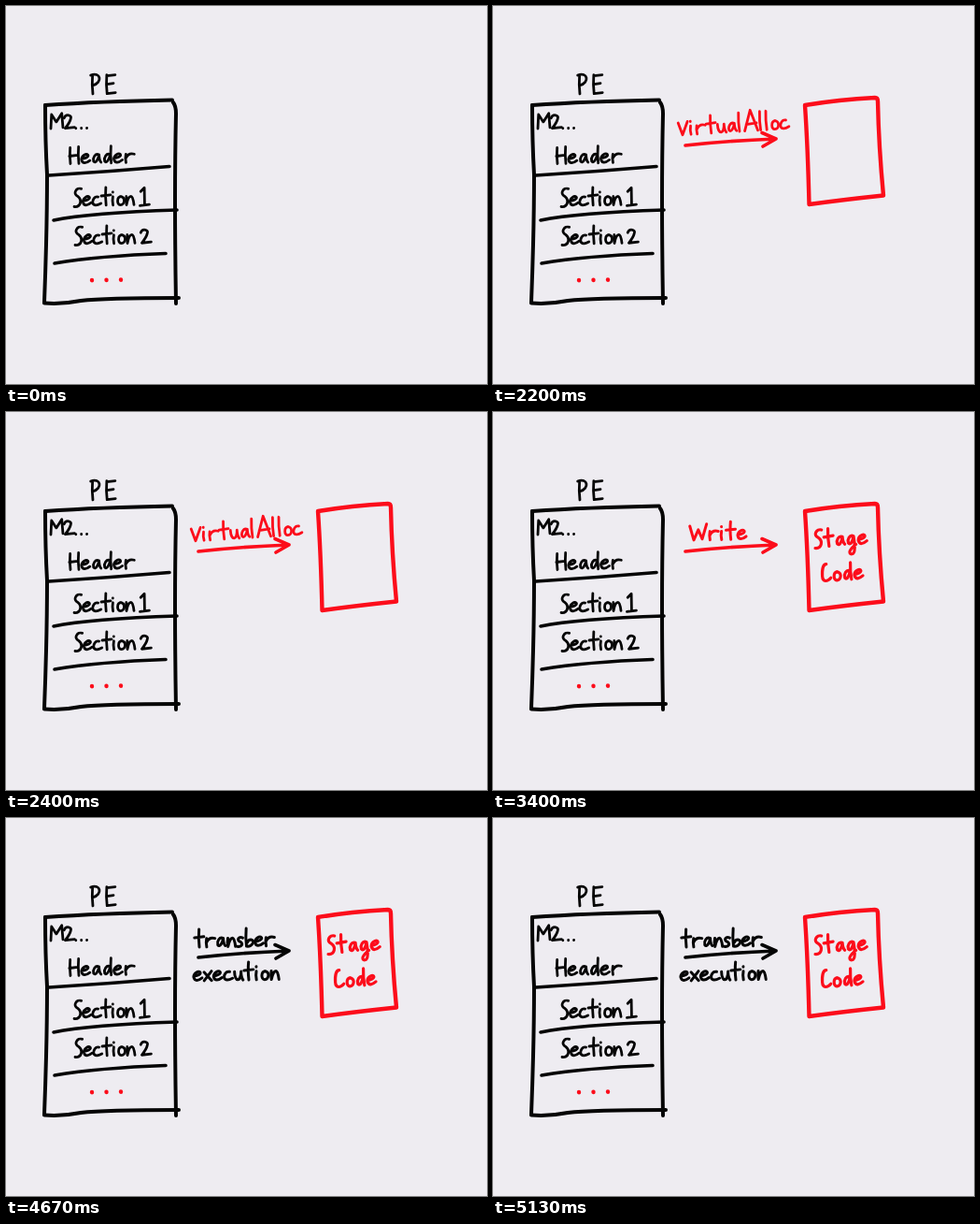
These frames come from a looping animation (515 by 404 pixels, 6.07 s). An HTML page:

```html
<!DOCTYPE html>
<html lang="en">
<head>
<meta charset="utf-8">
<title>PE staging</title>
<style>
  html, body { margin: 0; width: 100%; height: 100%; overflow: hidden; background: #eeecf1; }
  svg { display: block; width: 100vw; height: 100vh; }
  path { fill: none; stroke-linecap: round; stroke-linejoin: round; }
</style>
</head>
<body>
<svg viewBox="0 0 515 404"></svg>
<script>
const BLACK = '#050505', RED = '#fc0d1b', LOOP = 6070;
const svg = document.querySelector('svg');

// Pen strokes shared by the handwritten letters; the baseline is y = 0.
const stem = (x, height) => `M${x} ${-height}q-1 ${height / 2} 0 ${height}`;
const bar = (x, height, width) => `M${x} ${-height}l${width}-1`;
const dot = (x, height) => `M${x} ${-height}v.3`;
const bowl = 'M7-9C3-11 0-6 1-2C3 1 6-4 7-9';
const two = 'M0-11C2-16 9-14 7-10Q6-6 1 0L11-1';

const glyphs = {
  a: bowl + 'Q7-3 9-1',
  c: 'M6-9C2-10 0-6 0-3C1 1 5 0 9-2',
  d: bowl + stem(8, 18),
  e: 'M0-5C4-5 8-7 7-9C5-11 0-8 0-4C1 1 5 0 9-3',
  f: stem(2, 19) + 'C8 1 12-6 7-7Q4-7 3-4',
  g: bowl + 'C8 0 8 10 4 10C0 10 1 5 9 0',
  i: stem(1, 9) + dot(1, 14),
  l: stem(1, 20),
  n: stem(1, 9) + 'C2-5 4-9 6-9Q8-9 9 0',
  o: 'M4-9C-1-9-1 0 3 0C8 0 9-9 3-9',
  r: stem(1, 9) + 'M1-5Q4-11 10-9',
  s: 'M6-9C2-11-1-7 3-5C7-3 5 1 0 0',
  t: stem(4, 19) + bar(-1, 10, 10),
  u: 'M0-9C0 3 7 2 7-9Q7-3 9 0',
  x: 'M0-9L8 0' + 'M8-10L0 0',
  z: two,
  A: 'M0 0L7-22L14 0' + bar(2, 7, 11),
  C: 'M6-18C2-18 1-10 1-5C1 1 6 1 10-3',
  E: stem(2, 20) + bar(2, 19, 9) + bar(2, 10, 7) + bar(2, 0, 9),
  H: stem(1, 17) + bar(0, 8, 9) + stem(10, 18),
  M: 'M0 0L1-15L6-7L12-16L13-1',
  P: stem(2, 20) + 'M0-20C11-24 13-12 2-9',
  S: 'M8-18C3-20-2-13 4-10C9-6 7 2 0 1',
  V: 'M0-13L4 0L10-14',
  W: 'M0-15L4 0L9-11L13-1L18-17',
  1: 'M1-14L5-18V0' + bar(0, -1, 10),
  2: two,
  '.': dot(0, 0)
};

function add(parent, tag, attrs = {}) {
  const node = document.createElementNS('http://www.w3.org/2000/svg', tag);
  for (const key in attrs) node.setAttribute(key, attrs[key]);
  return parent.appendChild(node);
}

const line = (parent, d, color, width = 4) =>
  add(parent, 'path', { d, stroke: color, 'stroke-width': width });

// Each letter advances the pen by its own drawn width plus a gap.
function write(parent, text, x, y, color, { tracking = 0, tilt = -1, weight = 2.8 } = {}) {
  const word = add(parent, 'g', {
    role: 'img', 'aria-label': text, transform: `translate(${x} ${y}) rotate(${tilt})`
  });
  let pen = 0;
  for (const char of text) {
    if (char === ' ') { pen += 5; continue; }
    const letter = line(word, glyphs[char], color, weight);
    const box = letter.getBBox();
    letter.setAttribute('transform', `translate(${pen} 0)`);
    pen += Math.max(box.x + box.width, 4.5) + 1.4 + tracking;
  }
}

const arrow = (parent, color) =>
  line(parent, 'M206 149Q250 144 303 142M288 135.5L303 142L289 150', color, 3.6);

function drawFile(g) {
  line(g, 'M42 106Q100 102 178 100.5', BLACK);
  line(g, 'M42 106Q42 145 44 180Q44 240 41 317', BLACK);
  line(g, 'M179 103Q182 107 182 115Q180 200 182 318', BLACK);
  line(g, 'M41 317.5Q60 319 80 315Q105 312 185 312', BLACK);
  line(g, 'M46 181Q110 177 175 171.5', BLACK, 3.6);
  line(g, 'M51 229Q90 221 183 218', BLACK, 3.6);
  line(g, 'M52 275Q100 267 171 264.5', BLACK, 3.6);
  write(g, 'PE', 91, 94, BLACK, { tracking: 4.5 });
  write(g, 'Mz...', 48, 131, BLACK);
  write(g, 'Header', 68, 168.5, BLACK, { tracking: 1.5 });
  write(g, 'Section 1', 73, 213.5, BLACK);
  write(g, 'Section 2', 74, 254.5, BLACK);
  write(g, '...', 92, 293, RED, { tracking: 9.6, weight: 4.4 });
}

function drawMemory(g) {
  line(g, 'M334 106Q370 100 409 98Q412 98 412 102Q413 150 418 202.5Q375 207 338.5 212Q337 150 334 106', RED, 4.4);
}

function drawAlloc(g) {
  write(g, 'VirtualAlloc', 199, 138, RED, { tracking: 0.7, tilt: -3.5 });
  arrow(g, RED);
}

function drawWrite(g) {
  write(g, 'Write', 211, 137, RED, { tracking: 1, weight: 3 });
  arrow(g, RED);
}

function drawStage(g) {
  write(g, 'Stage', 345, 144.5, RED, { tracking: 1.5, tilt: -4, weight: 3.2 });
  write(g, 'Code', 352, 181, RED, { tracking: 2, tilt: -4, weight: 3.2 });
}

function drawTransfer(g) {
  write(g, 'transfer', 203, 138, BLACK, { tracking: 0.5, weight: 3 });
  write(g, 'execution', 201, 174, BLACK, { tracking: 0.8, weight: 3 });
  arrow(g, BLACK);
}

const scenes = [
  { draw: drawFile, start: 0 },
  { draw: drawMemory, start: 2200 },
  { draw: drawAlloc, start: 2200, end: 3400 },
  { draw: drawStage, start: 3400 },
  { draw: drawWrite, start: 3400, end: 4670 },
  { draw: drawTransfer, start: 4670 }
].map(({ draw, start, end = LOOP }) => {
  const node = add(svg, 'g');
  draw(node);
  return { node, start, end };
});

function render(now) {
  const t = now % LOOP;
  for (const { node, start, end } of scenes) {
    node.style.display = t >= start && t < end ? '' : 'none';
  }
  requestAnimationFrame(render);
}
render(performance.now());
</script>
</body>
</html>
```
